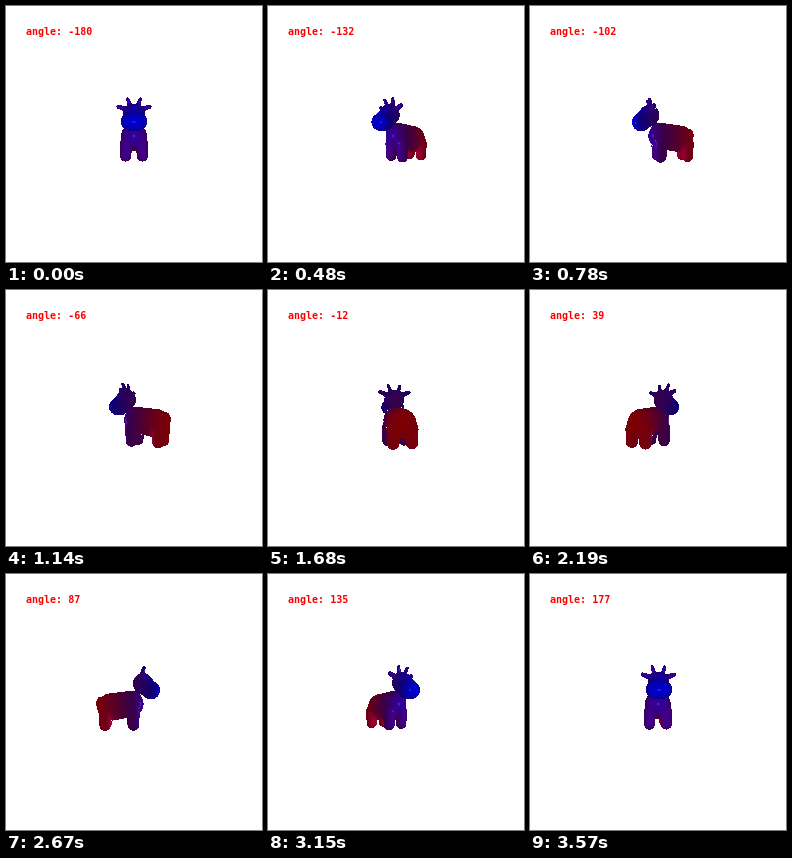
Recreate the animation shown at these times as an HTML page with a canvas. Size 256 by 256 pixels, loop 3.6 s.

```html
<!DOCTYPE html>
<html lang="en">
<head>
<meta charset="utf-8">
<title>Rotating cow</title>
<style>
html, body { margin: 0; width: 100%; height: 100%; overflow: hidden; background: #fff; }
canvas { display: block; }
#label {
  position: absolute; left: 20px; top: 20px; white-space: pre; color: #f00;
  font: bold 10px/12px "DejaVu Sans Mono", monospace;
}
</style>
</head>
<body>
<canvas id="stage" width="256" height="256"></canvas>
<div id="label"></div>
<script>
const ctx = document.getElementById('stage').getContext('2d');
const label = document.getElementById('label');

const FOCAL = 222, LIGHT = 111, BLEND = 2.5;
const BOX = { x: 84, y: 88, w: 88, h: 74 };
const image = ctx.createImageData(BOX.w, BOX.h);

// Tapered capsules; points are (forward, up, side), mirrored across the side axis.
const parts = [];
function capsule(from, to, r, endR = r) {
  const [dx, dy, dz] = to.map((c, i) => c - from[i]);
  const [x, y, z] = from;
  parts.push({ x, y, z, r, dx, dy, dz, dr: endR - r, len2: dx * dx + dy * dy + dz * dz });
}

const rump = [-23, -5, 0], chest = [-3.5, -2, 0], skull = [9, 18.5, 0], muzzle = [17, 11.5, 0];
const shift = ([x, y, z], dx, dy, dz = 0) => [x + dx, y + dy, z + dz];

capsule(rump, chest, 13.5, 13);
capsule(skull, muzzle, 10.2, 8.2);
capsule(muzzle, shift(muzzle, 0, 0, 4), 8.2);
for (const hip of [-28, -1]) capsule([hip, -10, 8], [hip, -22.2, 8.4], 6.2, 5.4);
capsule(shift(skull, -2, 5, 7), shift(skull, -2, 8, 15), 2.6, 2);    // ear
capsule(shift(skull, -1, 9, 4), shift(skull, 0.5, 15, 6), 2, 1.5);   // horn
capsule(shift(rump, -11, 8), shift(rump, -14, 3), 2, 1);             // tail

function distance(x, y, z) {
  z = Math.abs(z);
  let best = 1e3;
  for (const p of parts) {
    const ax = x - p.x, ay = y - p.y, az = z - p.z;
    const h = Math.max(0, Math.min(1, (ax * p.dx + ay * p.dy + az * p.dz) / p.len2));
    const bx = ax - h * p.dx, by = ay - h * p.dy, bz = az - h * p.dz;
    const d = Math.sqrt(bx * bx + by * by + bz * bz) - p.r - h * p.dr;
    const k = Math.max(0, BLEND - Math.abs(best - d));
    best = Math.min(best, d) - k * k / (4 * BLEND);
  }
  return best;
}

const dot = (a, b) => a[0] * b[0] + a[1] * b[1] + a[2] * b[2];
function unit(v) {
  const n = Math.sqrt(dot(v, v));
  return v.map(c => c / n);
}

// Blue at the nose to red at the tail, lit by a fixed lamp ahead of the cow.
function shade(x, y, z, ray) {
  const e = 0.1, d = distance(x, y, z);
  const normal = unit([distance(x + e, y, z) - d, distance(x, y + e, z) - d, distance(x, y, z + e) - d]);
  const light = unit([LIGHT - x, -y, -z]);
  const facing = Math.max(0, dot(normal, light));
  const mirror = normal.map((n, i) => 2 * facing * n - light[i]);
  const shine = facing && 0.2 * Math.max(0, -dot(mirror, ray)) ** 64;
  const diffuse = 0.5 + 0.3 * facing;
  const blue = Math.max(0, Math.min(1, (x + 38) / 63));
  return [(1 - blue) * diffuse + shine, shine, blue * diffuse + shine].map(c => c * 255);
}

function trace(px, py, sin, cos) {
  const sx = px - 128, sy = 128 - py;
  const ray = unit([cos * FOCAL + sin * sx, sy, cos * sx - sin * FOCAL]);
  for (let t = 170, i = 0; i < 60 && t < 275; i++) {
    const x = ray[0] * t - cos * FOCAL, y = ray[1] * t, z = ray[2] * t + sin * FOCAL;
    const d = distance(x, y, z);
    if (d < 0.05) return shade(x, y, z, ray);
    t += d;
  }
  return [255, 255, 255];
}

function draw(angle) {
  const a = angle * Math.PI / 180, sin = Math.sin(a), cos = Math.cos(a);
  for (let y = 0, i = 0; y < BOX.h; y++) {
    for (let x = 0; x < BOX.w; x++, i += 4) {
      image.data.set([...trace(BOX.x + x + 0.5, BOX.y + y + 0.5, sin, cos), 255], i);
    }
  }
  ctx.putImageData(image, BOX.x, BOX.y);
  label.textContent = 'angle: ' + angle;
}

let shown;
function tick() {
  const angle = Math.floor(performance.now() % 3600 / 30) * 3 - 180;
  if (angle !== shown) draw(shown = angle);
  requestAnimationFrame(tick);
}
tick();
</script>
</body>
</html>
```
